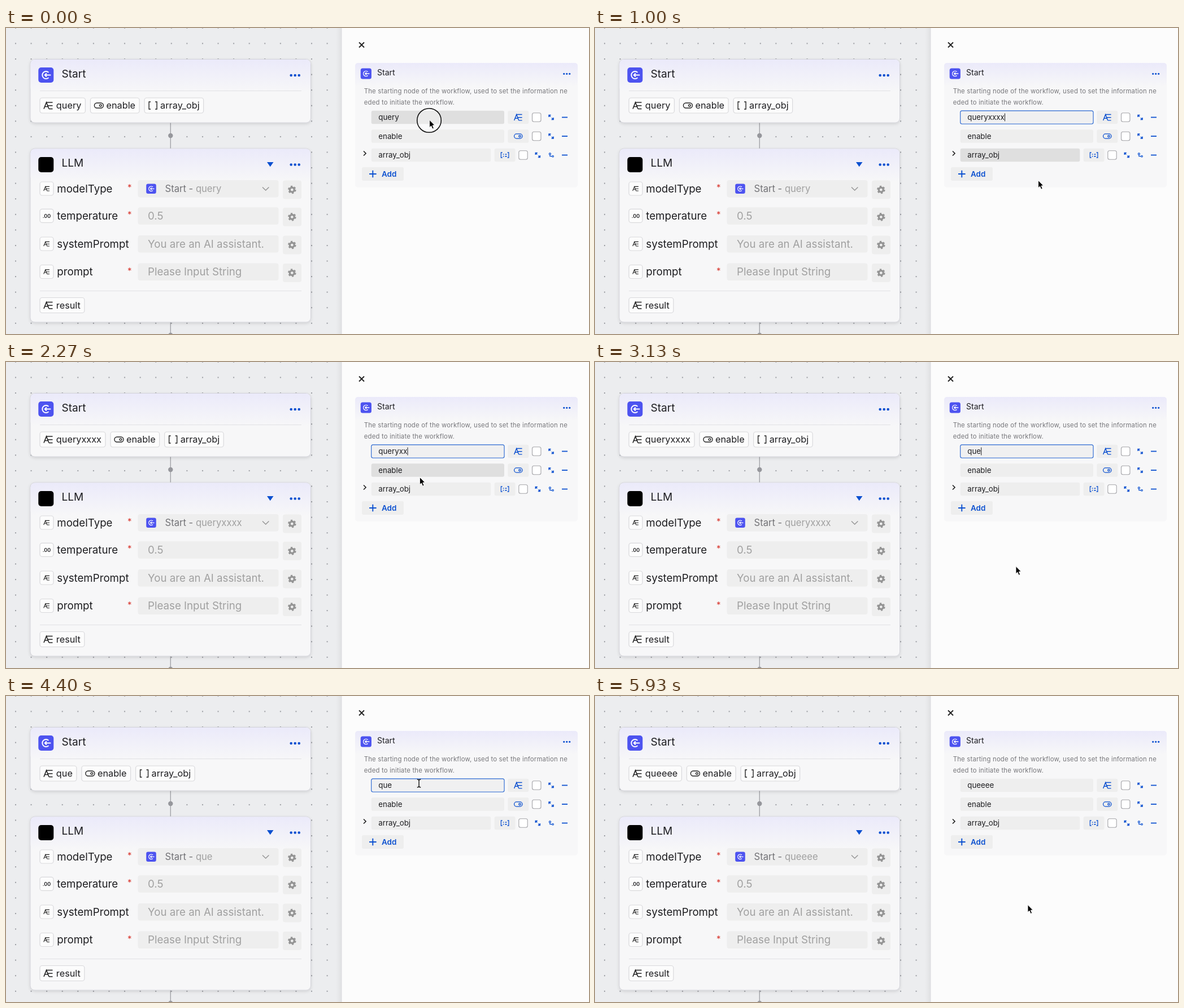
Animation, 1032 px wide and 543 px high, one loop 5.99 s. Source, as an HTML page:

```html
<!DOCTYPE html>
<html lang="en">
<head>
<meta charset="utf-8">
<title>Workflow editor</title>
<style>
html, body { margin: 0; width: 100%; height: 100%; overflow: hidden; background: #fcfcfc; }
svg { display: block; font-family: Inter, sans-serif; fill: #1d1d20; }
.line { fill: none; stroke: currentColor; stroke-width: 1.4; }
.blue { color: #0b50d0; }
.dark { color: #222; }
.gray { color: #949494; }
.white { color: #fff; }
.box { fill: #fcfcfc; stroke: #d9d9dc; stroke-width: 1.2; }
.field { fill: #eee; }
.hint { fill: #a0a0a0; }
.chip { font-size: 16.3px; }
.label { font-size: 18.7px; }
.small { font-size: 13.3px; }
.about { font-size: 11.3px; letter-spacing: .22px; fill: #77777b; }
</style>
</head>
<body>
<svg id="stage" width="1032" height="543" viewBox="0 0 1032 543"></svg>
<script>
const LOOP = 5990;
const stage = document.getElementById('stage');

// Markup helpers
const rect = (x, y, w, h, r = 0, attrs = '') =>
  `<rect x="${x}" y="${y}" width="${w}" height="${h}" rx="${r}" ${attrs}/>`;
const text = (x, y, str, attrs = '') => `<text x="${x}" y="${y}" ${attrs}>${str}</text>`;
const line = (d, attrs = '') => `<path class="line" d="${d}" ${attrs}/>`;
const circle = (x, y, r, attrs = '') => `<circle cx="${x}" cy="${y}" r="${r}" ${attrs}/>`;
const at = (x, y, body, scale = 1, cls = 'dark') =>
  `<g class="${cls}" transform="translate(${x} ${y}) scale(${scale})">${body}</g>`;
const dots = (x, y, gap, r) =>
  [-gap, 0, gap].map(d => circle(x + d, y, r, 'fill="#0b50d0"')).join('');

// Icons, centred on 0,0
const icons = {
  string: line('M-8 6-3.5-5.5 1 6M-6.5 2H-.5M-3.5-5.5H7.5M-1 .3H7.5M1 6H7.5', 'style="stroke-width:1.6"'),
  toggle: line('M-3.5-4.5H3.5A4.5 4.5 0 0 1 3.5 4.5H-3.5A4.5 4.5 0 0 1-3.5-4.5Z') +
    circle(3, 0, 1.9, 'class="line"'),
  array: line('M-5-5H-7.5V5H-5M5-5H7.5V5H5M-3-2.5V-.5M-3 1.5V3.5M0-1.5H4M0 2.5H4'),
  brackets: line('M-4-6.5H-7V6.5H-4M4-6.5H7V6.5H4'),
  expand: line('M-4-.5V-4H-.5M-4-4-1-1M4 .5V4H.5M4 4 1 1', 'style="stroke-width:1.5"'),
  branch: circle(-2.5, -2.5, 1.8, 'class="line"') + circle(3.5, 2.5, 1.6, 'class="line"') +
    line('M-2.5-.5V2.5H1.5'),
  minus: line('M-5 0H5', 'style="stroke-width:1.8"'),
  gear: circle(0, 0, 4.3, 'class="line" style="stroke-width:3.6"') +
    circle(0, 0, 6.6, 'class="line" style="stroke-width:2.6" stroke-dasharray="3.456"'),
  start: rect(-13.5, -13.5, 27, 27, 5, 'fill="#4d53f0"') +
    `<g class="white">${line('M4.6-4.6A6.5 6.5 0 1 0 4.6 4.6M-2 0H8.5M1-3-2 0 1 3', 'style="stroke-width:2"')}</g>`,
};

const card = (y, h, title) =>
  rect(43, y, 496.5, h, 8, 'fill="#f7f7f8" stroke="#d3d3da" filter="url(#shadow)"') +
  rect(43.5, y + .5, 495.5, 58, 8, 'fill="url(#head)"') +
  text(98.5, y + 32, title, 'font-size="19.1"') + dots(511.7, y + 28.5, 7, 2.3);

function chip(id, icon, y, offset, label) {
  return `<g id="${id}" class="chip">` + rect(0, y, 0, 27, 4, 'class="box"') +
    at(15, y + 13.5, icons[icon]) + text(offset, y + 19.3, label) + '</g>';
}

function paramRow(y, icon, name, required, hint) {
  const mark = icon ? at(72, y, icons[icon], .66) :
    text(72, y + 3.3, '.00', 'font-size="9" font-weight="600" text-anchor="middle"');
  return rect(60, y - 12, 24, 24, 4, 'class="box"') + mark +
    text(90.3, y + 6.7, name, 'class="label"') +
    (required ? text(215, y + 3, '*', 'font-size="15" style="fill:#d8372f"') : '') +
    rect(233.5, y - 15, 249, 30.5, 4, 'class="field"') +
    (hint ? text(251, y + 6.7, hint, 'class="label hint"') : '') +
    rect(490, y - 14.5, 33, 33, 4, 'class="field"') + at(506.3, y + 2, icons.gear, .92, 'gray');
}

function fieldRow(i, name, icon, nested) {
  const y = 158.5 + i * 33.5, shift = nested ? -23.7 : 0;
  return rect(646.7, y - 11.7, 235.3 + shift, 23.4, 3, `id="field${i}"`) +
    text(659.3, y + 4.7, name, `id="name${i}" class="small"`) +
    rect(888.3 + shift, y - 11.7, 37, 23.4, 3, 'class="field"') +
    at(906.8 + shift, y, icons[icon], .9, 'blue') +
    rect(931.5 + shift, y - 7.7, 15.4, 15.4, 3, 'fill="#fff" stroke="#a4a4a8" stroke-width="1.1"') +
    at(965 + shift, y, icons.expand, 1, 'blue') +
    (nested ? at(965, y, icons.branch, .85, 'blue') : '') + at(989, y, icons.minus, 1, 'blue');
}

stage.innerHTML = `
<defs>
  <pattern id="grid" x="3.2" y="13.6" width="27.58" height="27.58" patternUnits="userSpaceOnUse">
    ${circle(13.8, 13.8, 1.1, 'fill="#8d8f95"')}
  </pattern>
  <linearGradient id="head" x2="0" y2="1">
    <stop stop-color="#ebeafa"/><stop offset="1" stop-color="#f7f7f8"/>
  </linearGradient>
  <linearGradient id="edge"><stop stop-color="#000" stop-opacity="0"/><stop offset="1" stop-color="#000" stop-opacity=".05"/></linearGradient>
  <filter id="shadow" x="-5%" y="-10%" width="110%" height="125%">
    <feDropShadow dx="0" dy="2" stdDeviation="2.5" flood-opacity=".12"/>
  </filter>
</defs>
${rect(0, 0, 594, 543, 0, 'fill="#ecedef"')}${rect(0, 0, 594, 543, 0, 'fill="url(#grid)"')}
${line('M291.3 168V214M291.3 522V543', 'style="stroke:#a2a3a8"')}
${card(55.5, 112.5, 'Start')}${at(70.8, 83.5, icons.start)}
${line('M60 111.5H523', 'style="stroke:#e1e1e4;stroke-width:1"')}
${chip('chip0', 'string', 124, 28.8, 'query')}
${chip('chip1', 'toggle', 124, 28, 'enable')}
${chip('chip2', 'brackets', 124, 28, 'array_obj')}
${card(214, 308, 'LLM')}${rect(57.3, 229, 27, 27, 5, 'fill="#000"')}
<path d="M462 238H473.5L467.7 246.3Z" fill="#0b50d0"/>
${paramRow(285, 'string', 'modelType', 1)}
${at(257, 285.3, icons.start, .65)}
<text x="281.5" y="291" font-size="16.6" fill="#727276">Start - <tspan id="source" class="hint"></tspan></text>
${at(459.7, 285.3, line('M-5.7-2.8 0 2.8 5.7-2.8'), 1, 'gray')}
${paramRow(333.3, '', 'temperature', 1, '0.5')}
${paramRow(383, 'string', 'systemPrompt', 0, 'You are an AI assistant.')}
${paramRow(432.5, 'string', 'prompt', 1, 'Please Input String')}
${line('M60 466.5H523', 'style="stroke:#e1e1e4;stroke-width:1"')}
${chip('chip3', 'string', 478.5, 28.8, 'result')}
${circle(291.3, 191, 4.2, 'fill="#96979c"')}${circle(291.3, 545, 4.2, 'fill="#96979c"')}
${rect(584, 0, 10, 543, 0, 'fill="url(#edge)"')}
${rect(594, 0, 438, 543, 0, 'fill="#fcfcfc"')}${rect(593.5, 0, 1, 543, 0, 'fill="#dcdce0"')}
${line('M625 25.5 634 34.5M634 25.5 625 34.5', 'style="stroke:#222;stroke-width:1.9"')}
${rect(618, 62, 394, 221, 5, 'fill="#f7f7f8"')}${rect(618, 62, 394, 42, 5, 'fill="url(#head)"')}
${at(637.3, 81, icons.start, .71)}${text(657, 84.3, 'Start', 'font-size="14"')}${dots(992.7, 81.3, 5, 1.6)}
${text(633.7, 115.6, 'The starting node of the workflow, used to set the information ne', 'class="about"')}
${text(633.7, 135.6, 'eded to initiate the workflow.', 'class="about"')}
${fieldRow(0, 'query', 'string')}
${fieldRow(1, 'enable', 'toggle')}
${fieldRow(2, 'array_obj', 'array', true)}
${rect(0, 151.5, 1, 14, 0, 'id="caret"')}
${line('M633 218.5 637 222.5 633 226.5', 'style="stroke:#222;stroke-width:1.7"')}
${rect(630, 247, 74, 24, 3, 'class="field"')}
${at(649.3, 259, line('M-6.3 0H6.3M0-6.3V6.3', 'style="stroke-width:1.9"'), 1, 'blue')}
${text(665, 263.8, 'Add', 'font-size="13.4" font-weight="600" style="fill:#0b50d0"')}
<g id="cursor">
  ${circle(-.7, .8, 21.3, 'id="ring" fill="#fff" fill-opacity=".35" stroke="#111" stroke-width="1.6"')}
  <path id="arrow" d="M0 0V13.2L3 10.6 5.2 15.8 7.6 14.7 5.4 9.7 9.2 9.3Z" fill="#000" stroke="#fff" stroke-width=".9"/>
  ${line('M-3.2-7Q0-7 0-5Q0-7 3.2-7M0-5V5M-3.2 7Q0 7 0 5Q0 7 3.2 7', 'id="beam" style="stroke:#111"')}
</g>`;

// Timelines: [start ms, value]
const typed = [[0, 'query'], [350, 'queryx'], [470, 'queryxx'], [590, 'queryxxx'], [720, 'queryxxxx'],
  [2090, 'queryxxx'], [2200, 'queryxx'], [2400, 'queryx'], [2530, 'query'], [2650, 'quer'], [2780, 'que'],
  [4520, 'quee'], [4640, 'queee'], [4760, 'queeee']];
const saved = [[0, 'query'], [1400, 'queryxxxx'], [3320, 'que'], [5560, 'queeee']];
const focus = [[0, 0], [100, 2], [1380, 0], [1950, 2], [3300, 0], [4220, 1], [4480, 2], [5540, 0]]; // 2 = caret shown
const press = [[0, 1], [70, 0], [1330, 1], [1430, 0], [1890, 1], [1990, 0], [3220, 1], [3320, 0],
  [4160, 1], [4250, 0], [5470, 1], [5570, 0]];
const path = [[0, 749.7, 163.2], [800, 749.7, 163.2], [1200, 819, 376], [1400, 819, 376], [1770, 745, 153],
  [1980, 745, 153], [2080, 734, 156], [2650, 728, 341], [3080, 745, 362.5], [3600, 745, 362.5],
  [4100, 731, 155], [4870, 731, 155], [5350, 766, 370.5], [LOOP, 766, 370.5]];

const current = (track, t) => track.filter(([start]) => start <= t).pop()[1];

function position(t) {
  const i = Math.max(1, path.findIndex(([end]) => end >= t));
  const [t0, x0, y0] = path[i - 1], [t1, x1, y1] = path[i];
  const u = (t - t0) / (t1 - t0), s = u * u * (3 - 2 * u);
  return [x0 + (x1 - x0) * s, y0 + (y1 - y0) * s];
}

const rowAt = y => [0, 1, 2].findIndex(i => Math.abs(y - 158.5 - i * 33.5) < 11.7);
const el = id => document.getElementById(id);
const show = (id, on) => el(id).setAttribute('visibility', on ? 'visible' : 'hidden');

function placeChip(id, x) {
  const group = el(id), label = group.querySelector('text');
  const width = +label.getAttribute('x') + label.getComputedTextLength() + 7;
  group.setAttribute('transform', `translate(${x} 0)`);
  group.firstChild.setAttribute('width', width);
  return x + width + 9;
}

function render(t) {
  const name = current(saved, t), focused = current(focus, t);
  el('source').textContent = name;
  el('chip0').querySelector('text').textContent = name;
  ['chip0', 'chip1', 'chip2'].reduce((x, id) => placeChip(id, x), 60);
  placeChip('chip3', 60);

  el('name0').textContent = current(typed, t);
  el('caret').setAttribute('x', 659.5 + el('name0').getComputedTextLength());
  show('caret', focused === 2);

  const [x, y] = position(t);
  const hovered = rowAt(position(Math.max(0, t - 50))[1]);
  for (let i = 0; i < 3; i++) {
    const active = i === 0 && focused;
    const { style } = el('field' + i);
    style.fill = active ? '#f0f0f1' : i === hovered ? '#dfdfdf' : '#eee';
    style.stroke = active ? '#2b69d2' : 'none';
    style.strokeWidth = 1.15;
  }

  const beam = t > 100 && rowAt(y) >= 0;
  el('cursor').setAttribute('transform', `translate(${x} ${y})`);
  show('beam', beam);
  show('arrow', !beam);
  show('ring', current(press, t));
}

function tick() {
  render(performance.now() % LOOP);
  requestAnimationFrame(tick);
}
tick();
</script>
</body>
</html>
```
